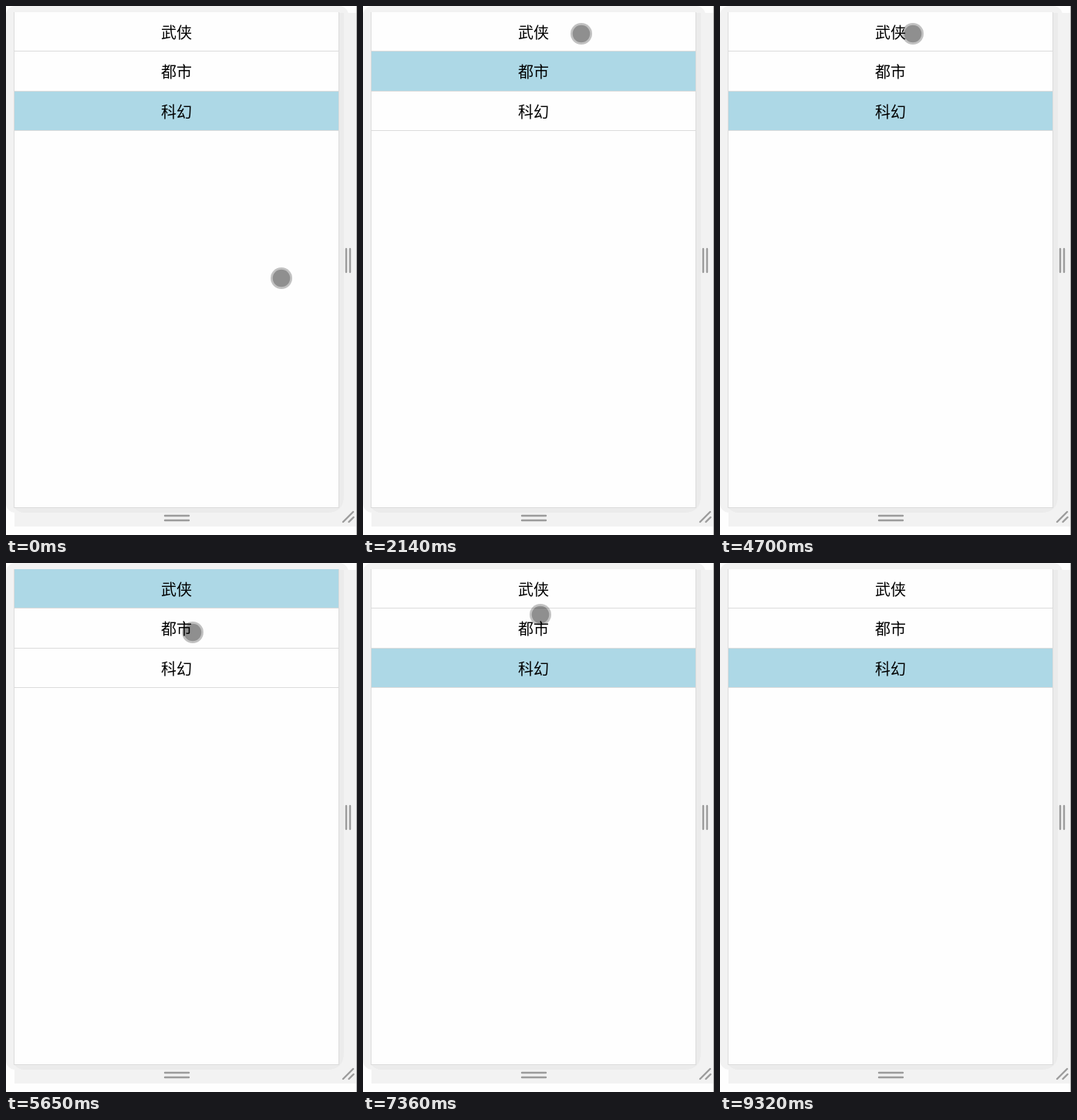
Recreate the animation shown at these times as an HTML page. Size 455 px wide and 686 px high, loop 9.75 s.

```html
<!DOCTYPE html>
<html lang="zh-CN">
<head>
<meta charset="utf-8">
<title>小说分类</title>
<style>
  html, body { margin: 0; width: 100%; height: 100%; overflow: hidden; background: #fefefe; }
  svg { display: block; width: 455px; height: 686px; }
  text {
    font: 350 20px "Noto Sans CJK SC", "Noto Sans CJK", "Noto Sans CJK JP", sans-serif;
    text-anchor: middle;
  }
  .strip { fill: #f2f2f2; }
  .shade { fill: #ebebeb; }
  .page { fill: #fefefe; }
  .line { fill: #dcdcdc; }
  .grip { stroke: #9c9c9c; stroke-width: 2.4; stroke-linecap: round; fill: none; }

  /* the slight negative delay keeps hard changes just ahead of their times */
  .pick { fill: #add8e6; animation: pick 9750ms -4ms step-end infinite; }
  .touch { animation: move 9750ms -4ms infinite, leave 9750ms -4ms step-end infinite; }

  @keyframes pick {
    0%, 41.026%, 69.641%, 86.974% { transform: translateY(111px); height: 50px; }
    13.846%, 32.205%, 60.821%, 76.954% { transform: translateY(59px); height: 51px; }
    23.179%, 50.974% { transform: translateY(8px); height: 50px; }
  }

  @keyframes move {
    0% { transform: translate(357px, 353px); }
    5.744% { transform: translate(357px, 353px); animation-timing-function: steps(6, start); }
    13.846% { transform: translate(300px, 87px); }
    18.051% { transform: translate(300px, 87px); animation-timing-function: steps(4, start); }
    23.179% { transform: translate(283px, 36px); }
    26.359% { transform: translate(283px, 36px); animation-timing-function: steps(4, start); }
    32.205% { transform: translate(250px, 100px); }
    35.077% { transform: translate(250px, 100px); animation-timing-function: steps(3, start); }
    39.692% { transform: translate(238px, 138px); }
    43.897% { transform: translate(238px, 138px); animation-timing-function: steps(4, start); }
    49.641% { transform: translate(250px, 36px); }
    54.872% { transform: translate(250px, 36px); animation-timing-function: steps(3, start); }
    59.487% { transform: translate(242px, 90px); }
    64% { transform: translate(242px, 90px); animation-timing-function: steps(3, start); }
    68.154% { transform: translate(238px, 155px); }
    72.513% { transform: translate(238px, 155px); animation-timing-function: steps(3, start); }
    76.954% { transform: translate(230px, 67px); }
    78.431% { transform: translate(230px, 67px); animation-timing-function: steps(4, start); }
    84.103% { transform: translate(220px, 136px); animation-timing-function: step-start; }
    85.538% { transform: translate(218px, 138px); }
    88.41% { transform: translate(218px, 138px); animation-timing-function: steps(5, start); }
    95.59%, 100% { transform: translate(260px, 668px); }
  }

  @keyframes leave {
    0% { opacity: 1; }
    95.59%, 100% { opacity: 0; }
  }
</style>
</head>
<body>
<svg viewBox="0 0 455 686">
  <!-- device frame -->
  <rect class="strip" width="444" height="657" rx="12"/>
  <rect class="strip" x="432" y="9" width="22" height="666"/>
  <rect class="strip" x="11" y="651" width="443" height="24"/>
  <path class="shade" d="M432 9h6v626q0 22-22 22H24q-8 0-13-6h421z"/>
  <rect x="454" y="0" width="1" height="686" fill="#aaa"/>

  <!-- page -->
  <rect class="line" x="10" y="8" width="422" height="643"/>
  <rect class="page" x="11" y="8" width="420" height="642"/>
  <rect class="pick" x="11" width="420" height="50"/>
  <rect class="line" x="11" y="58" width="420" height="1"/>
  <rect class="line" x="11" y="110" width="420" height="1"/>
  <rect class="line" x="11" y="161" width="420" height="1"/>
  <text x="221" y="41.5">武侠</text>
  <text x="221" y="92.5">都市</text>
  <text x="221" y="144.5">科幻</text>

  <!-- resize grips -->
  <path class="grip" d="M441 315v30M446 315v30M206 661h31M206 667h31M437 669l13-13M444.500 669l6-6"/>

  <g class="touch">
    <circle r="14" fill="#000" fill-opacity=".24"/>
    <circle r="11.300" fill="#000" fill-opacity=".26"/>
  </g>
</svg>
</body>
</html>
```
